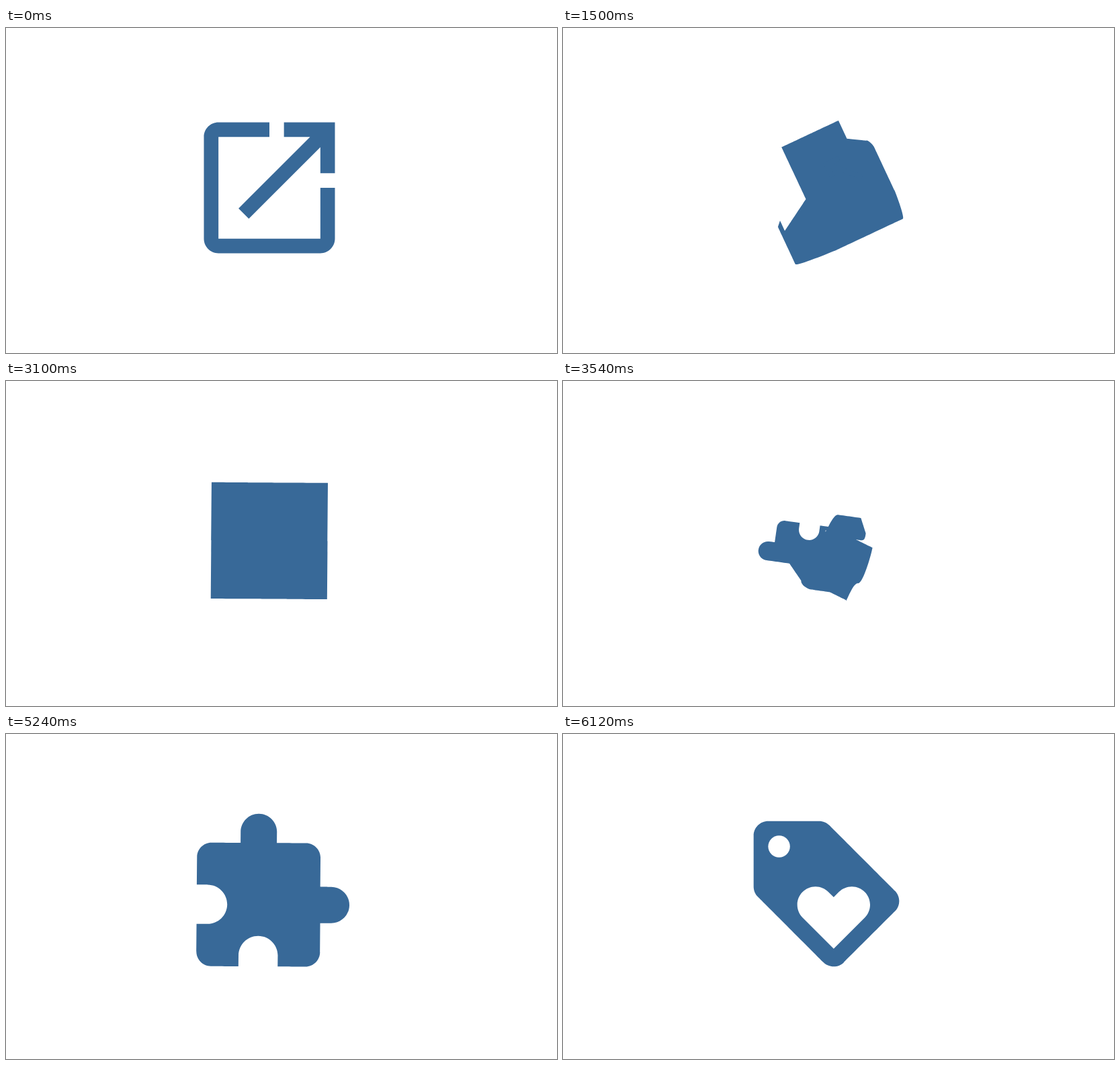
An HTML page for the animation above (7.08 s loop, 820 by 484 pixels).

```html
<!DOCTYPE html>
<html lang="en">
<head>
<meta charset="utf-8">
<title>Morphing icons</title>
<style>
  html, body { margin: 0; width: 100%; height: 100%; overflow: hidden; background: #fff; }
  svg { position: absolute; left: 262px; top: 108px; width: 260px; height: 260px; overflow: visible; }
</style>
</head>
<body>
<svg viewBox="0 0 24 24">
  <path id="body"/>
  <path id="arrow" d="M14 3v2h3.59l-9.83 9.83 1.41 1.41L19 6.41V10h2V3z"/>
  <path id="hole" d="M5.5 7C4.67 7 4 6.33 4 5.5S4.67 4 5.5 4 7 4.67 7 5.5 6.33 7 5.5 7z"/>
  <path id="heart" d="M17.27 15.27L13 19.54l-4.27-4.27C8.28 14.81 8 14.19 8 13.5c0-1.38 1.12-2.5 2.5-2.5.69 0 1.32.28 1.77.74l.73.72.73-.73c.45-.45 1.08-.73 1.77-.73 1.38 0 2.5 1.12 2.5 2.5 0 .69-.28 1.32-.73 1.77z"/>
</svg>
<script>
const LOOP = 7080, STEP = 20, STEPS = 45;
const STARTS = [980, 3100, 5240];
const BLUE = [56, 105, 152], WHITE = [255, 255, 255];

// Main silhouette of each icon and the point it turns around
const ICONS = [
  { c: [12, 12], d: 'M19 19H5V5h7V3H5c-1.11 0-2 .9-2 2v14c0 1.1.89 2 2 2h14c1.1 0 2-.9 2-2v-7h-2v7z' },
  { c: [12, 12], d: 'M20 4H15H11H10H9H4V12V20H9H12H13H15H20V12z' },
  { c: [12.5, 11.5], d: 'M20.5 11H19V7c0-1.1-.9-2-2-2h-4V3.5C13 2.12 11.88 1 10.5 1S8 2.12 8 3.5V5H4c-1.1 0-1.99.9-1.99 2v3.8H3.5c1.49 0 2.7 1.21 2.7 2.7s-1.21 2.7-2.7 2.7H2V20c0 1.1.9 2 2 2h3.8v-1.5c0-1.49 1.21-2.7 2.7-2.7 1.49 0 2.7 1.21 2.7 2.7V22H17c1.1 0 2-.9 2-2v-4h1.5c1.38 0 2.5-1.12 2.5-2.5S21.88 11 20.5 11z' },
  { c: [12, 12], d: 'M21.41 11.58l-9-9C12.05 2.22 11.55 2 11 2H4c-1.1 0-2 .9-2 2v7c0 .55.22 1.05.59 1.42l9 9c.36.36.86.58 1.41.58.55 0 1.05-.22 1.41-.59l7-7c.37-.36.59-.86.59-1.41 0-.55-.23-1.06-.59-1.42z' }
];

// Small parts that shrink away or grow in: their own centre and the far end of their travel
const ARROW = [14.38, 9.62];
const PARTS = [
  { id: 'arrow', morph: 0, c: ARROW, away: ARROW, color: BLUE, leaves: true },
  { id: 'hole', morph: 2, c: [5.5, 5.5], away: ARROW, color: WHITE },
  { id: 'heart', morph: 2, c: [13, 15.27], away: [14.55, 14.54], color: WHITE }
];

const $ = id => document.getElementById(id);
const mix = (a, b, q) => a.map((v, i) => v + (b[i] - v) * q);
const ease = p => p < 0.5 ? 2 * p * p : 1 - 2 * (1 - p) * (1 - p);
const ARGS = { M: 2, L: 2, H: 1, V: 1, C: 6, S: 4 };

// Turns path text into a start point and a list of cubic curves
function toCurves(d) {
  let x = 0, y = 0, start, ctrl;
  const curves = [];
  const curve = (...c) => {
    curves.push(c);
    ctrl = [c[2], c[3]];
    [x, y] = c.slice(4);
  };
  const line = (u, v) => curve(x, y, u, v, u, v);
  for (const [, cmd, rest] of d.matchAll(/([a-z])([^a-z]*)/gi)) {
    const type = cmd.toUpperCase(), rel = cmd !== type;
    if (type === 'Z') { line(...start); continue; }
    const nums = rest.match(/-?(\d+\.?\d*|\.\d+)/g).map(Number);
    for (let i = 0; i < nums.length; i += ARGS[type]) {
      let a = nums.slice(i, i + ARGS[type]);
      if (type === 'H') a = [a[0] + (rel ? x : 0), y];
      else if (type === 'V') a = [x, a[0] + (rel ? y : 0)];
      else if (rel) a = a.map((v, n) => v + (n % 2 ? y : x));
      if (type === 'M') { start = a; [x, y] = a; }
      else if (type === 'C') curve(...a);
      else if (type === 'S') curve(2 * x - ctrl[0], 2 * y - ctrl[1], ...a);
      else line(...a);
    }
  }
  return { start, curves };
}

const shapes = ICONS.map(icon => toCurves(icon.d));

// The shorter outline is filled up with curves resting on its last point
function morphPath(a, b, q) {
  const n = Math.max(a.curves.length, b.curves.length);
  const at = (s, i) => s.curves[i] || [...s.start, ...s.start, ...s.start];
  let d = 'M' + mix(a.start, b.start, q);
  for (let i = 0; i < n; i++) d += 'C' + mix(at(a, i), at(b, i), q);
  return d + 'z';
}

function draw(t) {
  const i = Math.max(0, STARTS.filter(s => t >= s).length - 1);
  const step = Math.floor((t - STARTS[i]) / STEP) + 1;
  const q = ease(Math.min(STEPS, Math.max(0, step)) / STEPS);
  const turn = 360 * q;

  const body = $('body');
  body.setAttribute('d', morphPath(shapes[i], shapes[i + 1], q));
  body.setAttribute('transform', `rotate(${turn} ${mix(ICONS[i].c, ICONS[i + 1].c, q).join(' ')})`);
  body.setAttribute('fill', `rgb(${BLUE})`);

  for (const part of PARTS) {
    const size = part.morph !== i ? 0 : part.leaves ? 1 - q : q;
    const [x, y] = mix(part.away, part.c, size);
    const el = $(part.id);
    el.style.display = size > 0 ? '' : 'none';
    el.setAttribute('transform',
      `translate(${x} ${y}) rotate(${turn}) scale(${size}) translate(${-part.c[0]} ${-part.c[1]})`);
    el.setAttribute('fill', `rgb(${mix(BLUE, part.color, size).map(Math.round)})`);
    el.setAttribute('fill-opacity', size);
  }
}

function tick() {
  draw(performance.now() % LOOP);
  requestAnimationFrame(tick);
}
tick();
</script>
</body>
</html>
```
